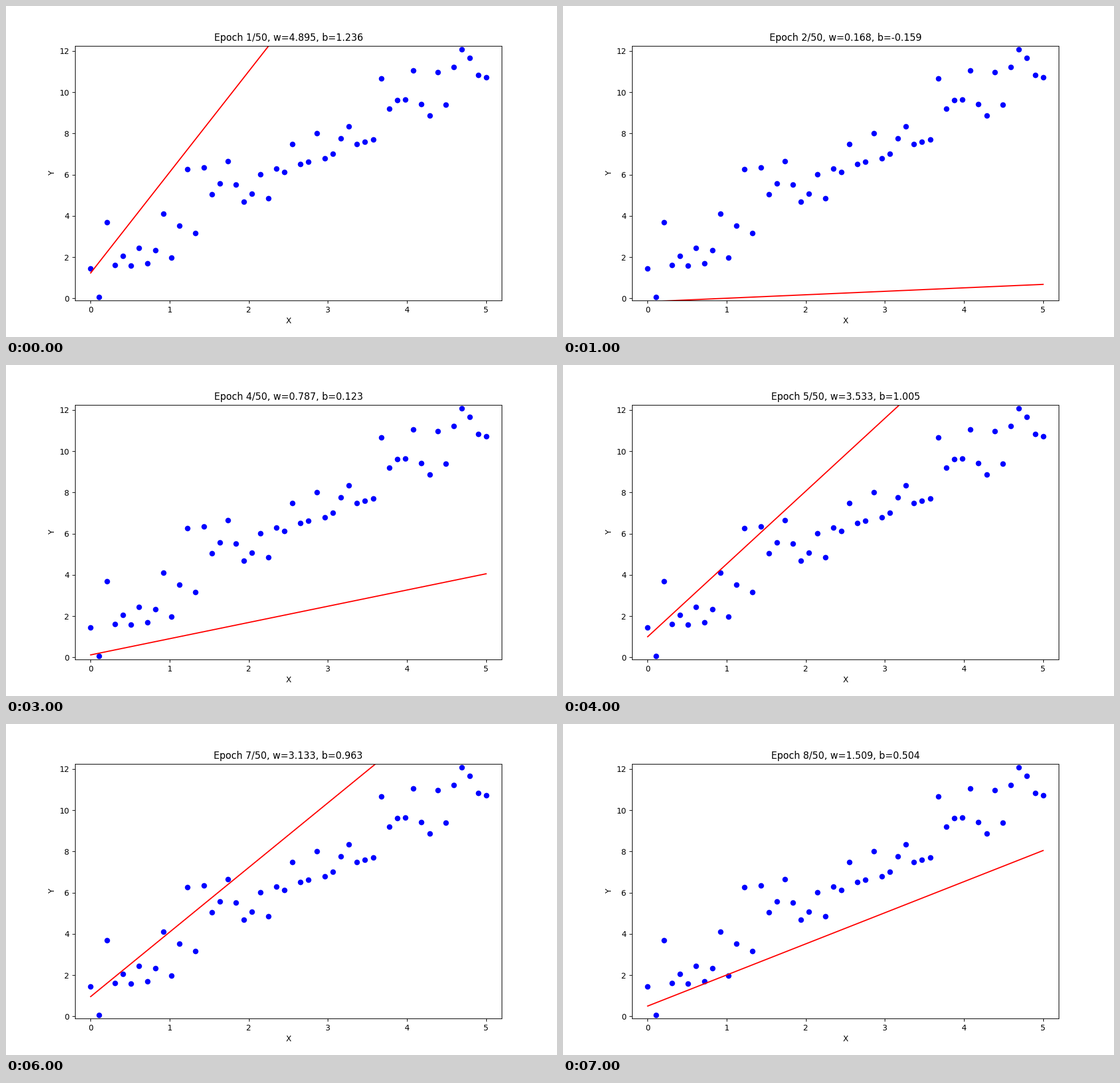
Write a matplotlib script that moves like this. It is 966 px wide and 580 px high and loops after 8 s.

```python
import numpy as np
import matplotlib.pyplot as plt
from matplotlib.animation import FuncAnimation

EPOCHS = 50
SHOWN = 8
RATE = 0.1

x = np.linspace(0, 5, 50)
y = np.array([
    1.44, 0.08, 3.70, 1.63, 2.06, 1.59, 2.46, 1.71, 2.35, 4.10,
    1.99, 3.52, 6.27, 3.18, 6.35, 5.04, 5.58, 6.65, 5.52, 4.69,
    5.09, 6.02, 4.87, 6.30, 6.13, 7.48, 6.51, 6.62, 8.00, 6.80,
    7.02, 7.77, 8.34, 7.48, 7.60, 7.71, 10.66, 9.21, 9.61, 9.64,
    11.06, 9.43, 8.86, 10.98, 9.40, 11.23, 12.09, 11.66, 10.84, 10.73,
])

# Moments of the unrounded data, used by the gradient
MEAN_XY, MEAN_Y = 20.663, 6.5005


def descend(w, b, steps):
    """Return (w, b) after each step of gradient descent on squared error."""
    path = [(w, b)]
    for _ in range(steps - 1):
        grad_w = 2 * (w * np.mean(x**2) + b * np.mean(x) - MEAN_XY)
        grad_b = 2 * (w * np.mean(x) + b - MEAN_Y)
        w, b = w - RATE * grad_w, b - RATE * grad_b
        path.append((w, b))
    return path


path = descend(4.895, 1.236, SHOWN)

plt.rcParams["font.family"] = "DejaVu Sans"
fig, ax = plt.subplots(figsize=(9.66, 5.8), dpi=100)
ax.scatter(x, y, color="blue")
line, = ax.plot([], [], color="red")
ax.set_xlim(-0.2, 5.2)
ax.set_ylim(-0.105, 12.26)
ax.set_xlabel("X")
ax.set_ylabel("Y")
title = ax.set_title("")


def update(i):
    w, b = path[i]
    line.set_data(x, w * x + b)
    title.set_text(f"Epoch {i + 1}/{EPOCHS}, w={w:.3f}, b={b:.3f}")
    return line, title


anim = FuncAnimation(fig, update, frames=SHOWN, interval=1000,
                     repeat=True, repeat_delay=0, blit=False)
plt.show()
```
